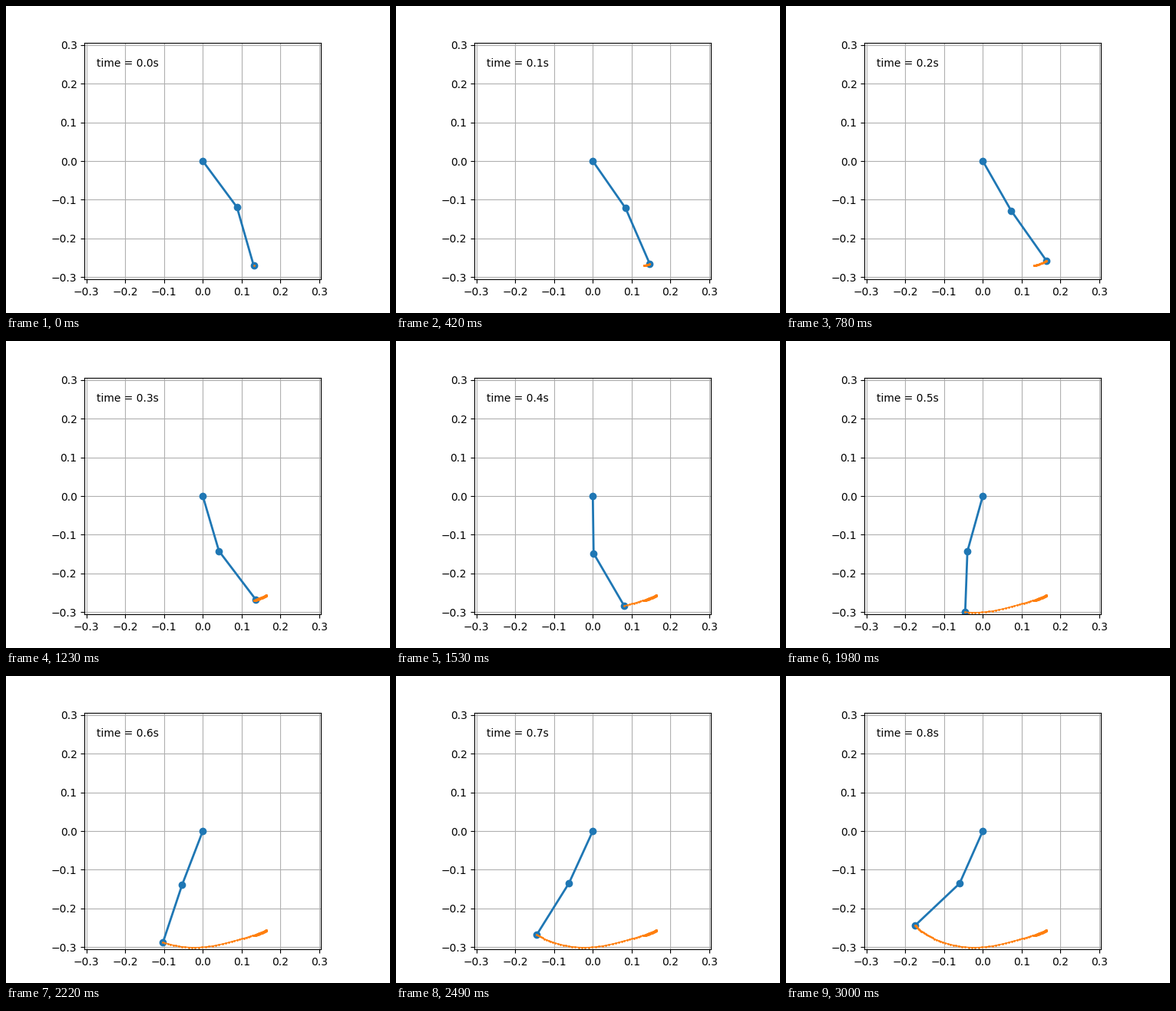
A matplotlib script for the animation above (3030 ms loop, 500 px wide and 400 px high).

```python
import numpy as np
import matplotlib.pyplot as plt
from matplotlib.animation import FuncAnimation

FRAMES, INTERVAL = 101, 30
DT = 0.008           # simulated seconds per step
L1, L2 = 0.148, 0.157
L = L1 + L2

# Key poses of both arms: step and angle from the vertical (rad)
STEPS = np.array([0, 18, 26, 36, 41, 51, 66, 83, 90, 100], float)
ANGLE1 = [0.637, 0.585, 0.519, 0.388, 0.2855, 0.014,
          -0.2716, -0.4285, -0.438, -0.4168]
ANGLE2 = [0.279, 0.479, 0.614, 0.665, 0.649, 0.5275,
          -0.0366, -0.5585, -0.6866, -0.8135]


def spline(x, y, xs):
    """Cubic spline that starts at rest and has a free end."""
    y = np.asarray(y)
    h, n = np.diff(x), len(x)
    d = np.diff(y) / h
    a, b = np.zeros((n, n)), np.zeros(n)
    a[0, 0] = 1
    for i in range(1, n - 1):
        a[i, i - 1:i + 2] = h[i], 2 * (h[i - 1] + h[i]), h[i - 1]
        b[i] = 3 * (h[i] * d[i - 1] + h[i - 1] * d[i])
    a[-1, -2:] = 1, 2
    b[-1] = 3 * d[-1]
    m = np.linalg.solve(a, b)

    k = np.clip(np.searchsorted(x, xs, side="right") - 1, 0, n - 2)
    s = (xs - x[k]) / h[k]
    return ((1 + 2 * s) * (1 - s) ** 2 * y[k] + s * (1 - s) ** 2 * h[k] * m[k]
            + s * s * (3 - 2 * s) * y[k + 1] + s * s * (s - 1) * h[k] * m[k + 1])


steps = np.arange(FRAMES, dtype=float)
th1 = spline(STEPS, ANGLE1, steps)
th2 = spline(STEPS, ANGLE2, steps)
x1, y1 = L1 * np.sin(th1), -L1 * np.cos(th1)
x2, y2 = x1 + L2 * np.sin(th2), y1 - L2 * np.cos(th2)

fig = plt.figure(figsize=(5, 4), dpi=100)
ax = fig.add_subplot(autoscale_on=False, xlim=(-L, L), ylim=(-L, L))
ax.set_aspect("equal")
ax.set_xticks(np.arange(-3, 4) / 10)
ax.set_yticks(np.arange(-3, 4) / 10)
ax.grid()

arms, = ax.plot([], [], "o-", lw=2)
trace, = ax.plot([], [], ".-", lw=1, ms=2)
label = ax.text(0.05, 0.9, "", transform=ax.transAxes)


def animate(i):
    arms.set_data([0, x1[i], x2[i]], [0, y1[i], y2[i]])
    trace.set_data(x2[:i + 1], y2[:i + 1])
    label.set_text(f"time = {i * DT:.1f}s")
    return arms, trace, label


anim = FuncAnimation(fig, animate, frames=FRAMES, interval=INTERVAL,
                     repeat=True, repeat_delay=0, blit=True)
plt.show()
```
